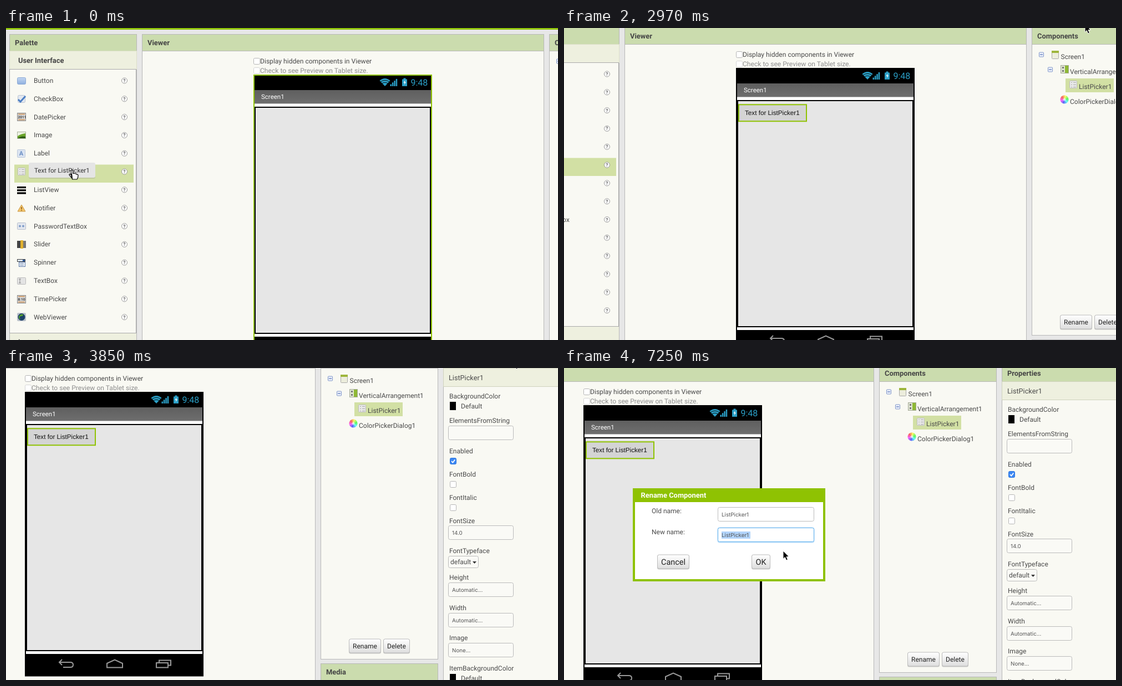
Recreate the animation shown at these times as an HTML page. Size 995 by 563 pixels, loop 8 s.

```html
<!DOCTYPE html>
<html lang="en">
<head>
<meta charset="utf-8">
<title>Adding a list picker</title>
<style>
html, body { margin: 0; width: 100%; height: 100%; overflow: hidden; background: #e7e7e7; }
svg { display: block; width: 995px; height: 563px; }
text { font: 12px Roboto, sans-serif; fill: #4a4a4a; white-space: pre; text-rendering: geometricPrecision; }
</style>
</head>
<body>
<svg id="stage" viewBox="0 0 995 563" xmlns="http://www.w3.org/2000/svg">
  <defs>
    <linearGradient id="btn" x2="0" y2="1"><stop stop-color="#fff"/><stop offset="1" stop-color="#dedede"/></linearGradient>
    <linearGradient id="bar" x2="0" y2="1"><stop stop-color="#5f5f5f"/><stop offset="1" stop-color="#6e6e6e"/></linearGradient>
    <linearGradient id="blue" x2="0" y2="1"><stop stop-color="#c3d6f1"/><stop offset="1" stop-color="#8fb0df"/></linearGradient>
  </defs>
  <g id="page"></g>
  <g id="chip"></g>
  <g id="dialog"></g>
  <path id="arrow" d="M0 0V14.5L3.3 11.4 5.6 17 8.3 15.9 6 10.5H10.5Z" fill="#000" stroke="#fff"/>
  <path id="hand" d="M-1.6 1Q0-1 1.6 1V6.5L4 6Q5 6 5.5 7L7.5 7 8.5 8.2Q11 7.5 11 10.5 11 14 9 17H0.5Q-1-1-1 14L-5 9Q-5 6.5-2.8 8L-1.6 9.5Z" fill="#fff" stroke="#000" stroke-width="1.2"/>
</svg>
<script>
const GREEN = '#8fc202', HEADER = '#cbdcae', STRIP = '#eef0df', BODY = '#f9f9f3',
      LINE = '#b8b8b8', PICKED = '#d2e0a4', CYAN = '#2b9fc6';
const $ = id => document.getElementById(id);
let layer = $('page');

function add(tag, attrs, content) {
  const el = document.createElementNS('http://www.w3.org/2000/svg', tag);
  for (const name in attrs) el.setAttribute(name, attrs[name]);
  if (content) el.textContent = content;
  return layer.appendChild(el);
}
const rect = (x, y, width, height, fill, more) => add('rect', { x, y, width, height, fill, ...more });
const box = (x, y, w, h, fill, stroke, more) => rect(x + .5, y + .5, w - 1, h - 1, fill, { stroke, ...more });
const path = (d, stroke, fill = 'none', width = 1) => add('path', { d, stroke, fill, 'stroke-width': width });
const circle = (cx, cy, r, fill, stroke = 'none') => add('circle', { cx, cy, r, fill, stroke });
const text = (x, y, value, style = '') => add('text', { x, y, style }, value);
const bold = (x, y, value, fill = '#444') => text(x, y, value, `font-size:12.9px;font-weight:bold;fill:${fill}`);
const small = (x, y, value) => text(x, y, value, 'font:9.8px Inter,sans-serif;fill:#555');

function panel(x, y, w, h, title) {
  box(x, y, w, h, BODY, LINE);
  box(x, y, w, 31, HEADER, LINE);
  bold(x + 10, y + 20, title);
}
function button(x, y, w, label, size = 12) {
  rect(x, y + 1, w, 26, '#aaa', { rx: 3, opacity: .6 });
  box(x, y, w, 26, 'url(#btn)', '#bbb', { rx: 3 });
  text(x + w / 2, y + 13 + size * .35, label, `font-size:${size}px;text-anchor:middle;fill:#222`);
}
const field = (x, y, w, value, stroke = '#bbb', fill = '#fafaf6') => {
  box(x, y, w, 26, fill, stroke, { rx: 3 });
  if (value) small(x + 7, y + 16.5, value);
};
const checkbox = (x, y, fill = '#fff', stroke = '#b5b5b5') => box(x, y, 12, 12, fill, stroke, { rx: 2 });

const listIcon = (x, y) => {
  box(x - 7, y - 7, 14, 14, '#e9e9e9', '#bdbdbd', { rx: 1 });
  for (const dy of [-3.5, .5, 4.5]) path(`M${x - 4} ${y + dy}h2m2 0h5`, '#aaa');
};
const clockIcon = (x, y, label) => {
  box(x - 8, y - 7, 16, 15, '#ddd', '#888');
  path(`M${x - 6} ${y - 4.5}h12M${x - 6} ${y + 5.5}h12`, '#c98b4b', 'none', 1.5);
  text(x - 6.5, y + 3, label, 'font-size:6.5px;font-weight:bold;fill:#333');
};

// Each icon is drawn around its centre.
const palette = {
  Button: (x, y) => box(x - 8, y - 6, 16, 13, 'url(#blue)', '#8ba9d4', { rx: 2 }),
  CheckBox: (x, y) => {
    box(x - 7, y - 7, 14, 14, '#e3e8f0', '#b9c2d0', { rx: 2 });
    path(`M${x - 6} ${y + 1}l4 4L${x + 7} ${y - 5}`, '#4d7fc4', 'none', 3);
  },
  DatePicker: (x, y) => clockIcon(x, y, '2011'),
  Image: (x, y) => {
    box(x - 8, y - 6, 16, 13, '#eef3e4', '#a9b39c');
    path(`M${x - 7} ${y + 6}V${y + 2}Q${x - 1} ${y - 2} ${x + 7} ${y - 3}V${y + 6}Z`, 'none', '#6aa52a');
    path(`M${x - 7} ${y + 6}Q${x - 1} ${y + 1} ${x + 7} ${y + 3}V${y + 6}Z`, 'none', '#2d5c14');
  },
  Label: (x, y) => {
    box(x - 8, y - 7, 15, 15, '#dbe4f1', '#bcc8da', { rx: 1 });
    text(x - 4.3, y + 4.2, 'A', 'font-size:11px;font-weight:bold;fill:#6b8fc4');
  },
  ListPicker: listIcon,
  ListView: (x, y) => [-6, -.8, 4.4].forEach(dy => rect(x - 8, y + dy, 16, 3.2, '#000')),
  Notifier: (x, y) => {
    path(`M${x} ${y - 6}L${x + 7} ${y + 6}H${x - 7}Z`, '#c99a4c', '#f5c568');
    path(`M${x} ${y - 2}v4m0 1.3v1.4`, '#7a4a10', 'none', 1.4);
  },
  PasswordTextBox: (x, y) => {
    box(x - 8, y - 6, 16, 13, '#e3e7ee', '#b7bfcc', { rx: 1 });
    circle(x - 3, y + .5, 2, '#7d9cc9'); circle(x + 3, y + .5, 2, '#7d9cc9');
  },
  Slider: (x, y) => {
    rect(x - 8, y - 6, 6, 13, '#444'); rect(x + 3, y - 6, 5, 13, '#777');
    rect(x - 2, y - 7, 5, 15, '#e0b02e');
  },
  Spinner: (x, y) => {
    box(x - 8, y - 6, 15, 5, '#dce6f5', '#444');
    rect(x + 2, y - 5, 4, 3, '#355f9f');
    box(x - 5, y - 1, 12, 9, '#f2f5fa', '#5d7aa8');
    path(`M${x - 3} ${y + 2}h7m-7 3h7`, '#5d7aa8');
  },
  TextBox: (x, y) => {
    box(x - 8, y - 6, 16, 13, '#e4e4e4', '#bbb', { rx: 1 });
    path(`M${x - 5} ${y - 3}h4m-2 0v7m-2 0h4`, '#888');
  },
  TimePicker: (x, y) => clockIcon(x, y, '8:10'),
  WebViewer: (x, y) => {
    rect(x - 8, y - 7, 16, 15, '#bcc3cb', { rx: 2 });
    circle(x, y + .5, 6.5, '#1d4168');
    path(`M${x - 5} ${y}q3-6 8-4q0 3-4 3t-1 6q-3-1-3-5Z`, 'none', '#57a52c');
  }
};

function drawPalette() {
  panel(6, 11, 230, 700, 'Palette');
  box(6, 41, 230, 34, STRIP, '#dcdfc8');
  bold(22, 63, 'User Interface');
  box(6, 74, 229, 477, BODY, '#aaa');
  rect(7, 551, 228, 32, STRIP);
  bold(22, 571, 'Layout');
  Object.entries(palette).forEach(([name, icon], i) => {
    const y = 94.8 + 32.82 * i;
    if (name === 'ListPicker') rect(15, 246.5, 215, 32.5, PICKED);
    icon(28, Math.round(y));
    text(50, y + 4.2, name);
    circle(213.5, y + .2, 5, '#fff', '#999');
    text(211.3, y + 3.2, '?', 'font-size:8.5px;font-weight:bold;fill:#666');
  });
}

function drawViewer() {
  panel(245, 11, 725, 700, 'Viewer');
  checkbox(446, 54); checkbox(446, 71, '#fff', '#d5d5d5');
  text(458, 64, 'Display hidden components in Viewer', 'font-size:12.1px');
  text(458, 81, 'Check to see Preview on Tablet size.', 'font-size:12.1px;fill:#8f8f8f');

  rect(447, 85, 320, 511, '#fff');
  rect(448, 86, 318, 26, '#000');
  rect(448, 112, 318, 24.5, 'url(#bar)');
  text(460, 128, 'Screen1', 'font-size:11.5px;fill:#fff');
  text(729.5, 104.3, '9:48', `font-size:16px;fill:${CYAN}`);
  path('M683 105L673.5 95Q683 87 692.500 95Z', 'none', CYAN);
  path('M674.500 97.500Q683 91 691.500 97.500M677 100.500Q683 96 689 100.500', '#000', 'none', .9);
  for (let i = 0; i < 4; i++) rect(692.5 + i * 3.4, 101.5 - i * 3.2, 2.5, 3.5 + i * 3.2, CYAN);
  path('M714 92.500h2.500v-2h4v2h2.500V105H714Z', 'none', CYAN);
  path('M719.500 94l-3 4.800h2l-.8 4 3.300-5.200h-2Z', 'none', '#fff');

  rect(449, 143, 316, 408, '#e6e6e6', { stroke: '#000', 'stroke-width': 2 });
  rect(448, 557, 318, 39, '#000');
  path('M513 567l-5 5 5 5M508 572h20q5 0 5 4.500t-5 4.500h-13', '#999', 'none', 2);
  path('M594 581.500v-7.500l14-6.500 14 6.500v7.500Z', '#999', 'none', 2);
  path('M683 573h21v8.500h-21ZM688 573v-4.500h21v9h-5', '#999', 'none', 2);
  const frame = rect(447, 85, 320, 511.5, 'none', { 'stroke-width': 2 });
  const dropLine = rect(450, 144, 314, 2, '#00f');
  const picker = add('g', {}), page = layer;
  layer = picker;
  rect(451, 150.3, 122, 30, '#d4d4d4', { stroke: GREEN, 'stroke-width': 2 });
  text(462, 169.3, 'Text for ListPicker1', 'font:11.7px "Liberation Sans",sans-serif;fill:#111');
  layer = page;
  return { frame, dropLine, picker };
}

function drawComponents() {
  panel(979, 11, 212, 556, 'Components');
  for (const [x, y] of [[996.5, 60], [1012.5, 87]]) {
    box(x - 4.5, y - 4.5, 9, 9, '#eef2fb', '#7f95c8', { rx: 1 });
    path(`M${x - 2.5} ${y}h5`, '#2b4fa5');
  }
  box(1015, 53, 13, 15, '#eceddc', '#aaa', { rx: 1 });
  rect(1015, 53, 13, 4, '#9db53c');
  box(1031, 79, 15, 15, '#dfe4d2', '#a5aa98');
  rect(1039, 80, 6, 13, '#8fb935');
  for (const dy of [82, 88]) rect(1034, dy, 3, 3, '#777');
  rect(1040, 103, 87, 25, PICKED);
  listIcon(1054, 114);
  for (let i = 0; i < 12; i++) {
    const at = a => `${1038 + 7.5 * Math.cos(a)} ${141 + 7.5 * Math.sin(a)}`;
    path(`M1038 141L${at(i * Math.PI / 6)}A7.5 7.5 0 0 1 ${at((i + 1.1) * Math.PI / 6)}Z`, 'none', `hsl(${i * 30 + 150} 90% 68%)`);
  }
  circle(1038, 141, 2.5, '#fff').setAttribute('opacity', .6);
  text(1031.5, 67.5, 'Screen1');
  text(1048, 94.5, 'VerticalArrangement1');
  text(1064, 121.5, 'ListPicker1');
  text(1048, 148.5, 'ColorPickerDialog1');
  button(1030, 529.5, 58, 'Rename');
  button(1092, 529.5, 48, 'Delete');
  panel(979, 574, 212, 140, 'Media');
}

function drawProperties() {
  panel(1200, 11, 300, 700, 'Properties');
  box(1200, 41, 300, 34, STRIP, '#cfd2be');
  text(1210, 63, 'ListPicker1', 'font-size:12.7px');
  const labels = { BackgroundColor: 92, ElementsFromString: 136, Enabled: 191, FontBold: 233, FontItalic: 275,
    FontSize: 317, FontTypeface: 371, Height: 419, Width: 474, Image: 528, ItemBackgroundColor: 583 };
  for (const name in labels) text(1211, labels[name] + 4.3, name);
  for (const y of [102, 593]) {
    rect(1212, y, 11, 15, '#000');
    text(1232, y + 12, 'Default');
  }
  field(1209, 145, 118);
  checkbox(1212, 203, '#3b87f3', '#2c74dd');
  path('M1215 209l2.300 2.500 4-5', '#fff', 'none', 1.8);
  checkbox(1212, 245); checkbox(1212, 287);
  field(1209, 325, 118, '14.0');
  box(1209, 380, 55, 22, '#fafaf6', '#bbb', { rx: 3 });
  text(1213, 395.3, 'default');
  path('M1253 390h7l-3.500 4Z', 'none', '#333');
  field(1209, 428, 118, 'Automatic...');
  field(1209, 483, 118, 'Automatic...');
  field(1209, 537, 118, 'None...');
}

function drawChip() {
  layer = $('chip');
  rect(41, 244, 120, 28, '#999', { rx: 3, opacity: .3 });
  rect(41, 243, 120, 27, '#e5e5e5', { rx: 3 });
  text(51, 261, 'Text for ListPicker1', 'font-size:11.6px;fill:#333');
}

function drawDialog() {
  layer = $('dialog');
  rect(124, 217, 347, 168, GREEN);
  rect(128, 242, 339, 139, '#fff');
  bold(138.5, 234, 'Rename Component', '#fff');
  text(158, 262, 'Old name:');
  text(158, 300, 'New name:');
  field(277, 251, 174, 'ListPicker1', '#bbb', '#fff');
  rect(276.5, 287.5, 175, 28, '#bfe0fa', { rx: 4 });
  field(277, 288, 174, '', '#5fb0ee', '#fff');
  rect(284, 295, 52, 13, '#b2d4fb');
  small(284, 305.3, 'ListPicker1');
  button(168, 336.5, 58, 'Cancel', 14.4);
  button(338, 336.5, 34, 'OK', 14.4);
}

rect(0, 0, 1500, 3, GREEN);
drawPalette();
const { frame, dropLine, picker } = drawViewer();
drawComponents();
drawProperties();
drawChip();
drawDialog();

// Keys are [step, x, y].
const scroll = [[15, 0, 0], [18, -45, -3], [20, -136, -12], [21, -204, -22], [22, -274, -34], [23, -338.5, -42],
  [24, -384, -43], [26, -412, -41], [29, -412, -17], [30, -411, -17]];
const pointer = [[0, 119, 256], [8, 530, 172], [12, 560, 190], [13, 560, 190], [15, 925, -9], [20, 939, -7],
  [23, 913, -11], [26, 914, -15], [30, 913, -11], [31, 913, -11], [38, 640, 518], [42, 640, 518], [49, 395, 330]];

function at(keys, step, ease = p => p) {
  const next = keys.findIndex(key => key[0] > step);
  if (next <= 0) return keys[next < 0 ? keys.length - 1 : 0].slice(1);
  const [a, b] = [keys[next - 1], keys[next]];
  const p = ease((step - a[0]) / (b[0] - a[0]));
  return [1, 2].map(i => a[i] + (b[i] - a[i]) * p);
}
const smooth = p => p * p * (3 - 2 * p);
const place = (id, [x, y]) => $(id).setAttribute('transform', `translate(${x} ${y})`);
const show = (el, on) => el.setAttribute('visibility', on ? 'visible' : 'hidden');

function render(now) {
  const step = Math.floor((now % 8000 + 9) / 148.1);
  const tip = at(pointer, step, smooth);
  const dragging = step < 9, hand = dragging || step > 36 && step < 43;
  place('page', at(scroll, step));
  place('chip', [tip[0] - 119, tip[1] - 256]);
  place('arrow', tip);
  place('hand', tip);
  show($('hand'), hand);
  show($('arrow'), !hand);
  show($('chip'), dragging);
  show(dropLine, dragging && tip[0] > 450);
  show(picker, !dragging);
  show($('dialog'), step >= 43);
  frame.setAttribute('stroke', dragging ? GREEN : '#000');
  requestAnimationFrame(render);
}
requestAnimationFrame(render);
</script>
</body>
</html>
```
